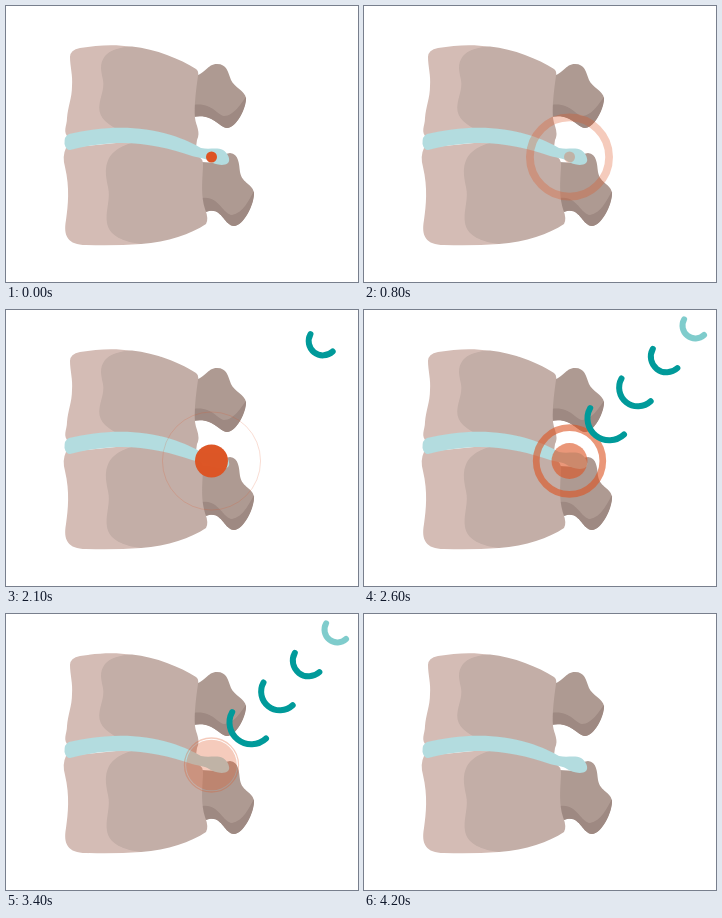
Write an HTML page that moves like this. It is 352 px wide and 276 px high and loops after 9200 ms.

```html
<!DOCTYPE html>
<html lang="en">
<head>
<meta charset="utf-8">
<title>Disc pain relief</title>
<style>
  html, body { margin: 0; width: 100%; height: 100%; overflow: hidden; background: #fff; }
  svg { display: block; width: 100vw; height: 100vh; }
  .light { fill: #d4bcb5; }
  .body { fill: #c3aea7; }
  .arch { fill: #ae9a92; }
  .shade { fill: #9e8982; }
  .disc { fill: #b3dcdf; }
  #waves { fill: none; stroke: #009a9a; stroke-width: 6; stroke-linecap: round; }
</style>
</head>
<body>
<svg viewBox="0 0 352 276">
  <!-- upper vertebra -->
  <path class="arch" d="M188 70C200 68 201 58 211 58C221 58 222 66 225 74C228 81 239 85 240 92C239 104 230 122 221 122C212 121 207 107 187 111Z"/>
  <path class="shade" d="M187 99C206 96 211 109 218 110C228 110 236 96 240 91C241 102 230 122 221 122C212 121 207 107 187 111Z"/>
  <path class="light" d="M64 51Q64 44 74 42C92 39 110 38 126 41L135 130L63 132C56 126 61 120 61 112C62 100 66 92 66 80C67 70 64 60 64 51Z"/>
  <path class="body" d="M126 40.5C150 43 174 53 190 63Q193 65 192 70C190 84 188 100 189 112C190 120 195 126 191 134L190 141L125 130C107 122 95 115 93.5 105C92 94 99 85 97 74C95 65 93 58 99 50C104 44 114 41 126 40.5Z"/>
  <!-- lower vertebra -->
  <path class="arch" d="M195 156L213 157Q217 147 224 147C233 148 233 158 234 166C236 178 248 178 248 188C247 200 237 220 228 220C218 219 216 202 203 205L196 207Z"/>
  <path class="shade" d="M196 192C212 189 217 208 226 209C237 207 243 194 248 185C249 199 237 220 228 220C218 219 216 202 203 205L196 207Z"/>
  <path class="light" d="M60 142Q56 150 59 161C64 182 62 200 60 214C57 230 62 239 80 239Q108 240 135 238L140 134Z"/>
  <path class="body" d="M128 136.5L142 134L190 149Q198 152 197 161C196 178 195 190 199 203Q203 213 200 218C185 228 162 236 135 238C118 236 103 230 101 217C99 205 105 193 102 181C100 171 98 162 103 152C107 145 116 139 128 136.5Z"/>
  <path class="disc" d="M63 128C93 121 130 118 165 129C178 133 188 138 195 142C203 144 211 141 217 144C222 147 225 154 222 157C217 161 208 158 203 155C199 152 194 152 186 150C150 138 115 131 64 144Q60 144 58.5 138Q58 130 63 128Z"/>
  <g fill="none" stroke="#dd5424">
    <circle id="ring" cx="205.5" cy="151"/>
    <circle id="spot" cx="205.5" cy="151" fill="#dd5424" stroke="none"/>
  </g>
  <g id="waves"></g>
</svg>
<script>
const LOOP = 9200, STEP = 100, BEAT = 1000, PULSES = 4, WAVES = 8;
const WAVE_START = 2000, WAVE_GAP = 200;
const $ = id => document.getElementById(id);
const clamp = v => Math.max(0, Math.min(1, v));
const hump = u => Math.sin(Math.PI * clamp(u));

const waves = Array.from({ length: WAVES }, () =>
  $("waves").appendChild(document.createElementNS("http://www.w3.org/2000/svg", "path")));

function set(el, attrs) {
  for (const k in attrs) el.setAttribute(k, attrs[k]);
}

// Pulses fade to a dim glow; the last one fades out completely
function fade(n, p) {
  if (n < 0 || n >= PULSES) return 0;
  return n === PULSES - 1 ? clamp(1 - 1.75 * p) : 1 - .7 * clamp(p / .8) ** 2;
}

function drawPulse(t) {
  const n = Math.floor(t / BEAT), p = t / BEAT - n;
  set($("spot"), {
    r: 5.5 + 20.3 * hump(clamp(p / .8) ** .82),
    opacity: fade(n, p)
  });
  // A ring outlives its own pulse by a moment
  const carry = p < .2 ? 1 : 0, q = p + carry;
  set($("ring"), {
    r: 27 + 31.5 * (q - .4),
    "stroke-width": 8 * hump((q - .36) / .76),
    opacity: fade(n - carry, q)
  });
}

function drawWave(el, k) {
  const x = 331.3 - 28.7 * k, y = 15.6 + 31 * k, r = Math.max(1, 12.8 + 2.97 * k);
  const at = deg => {
    const a = deg * Math.PI / 180;
    return `${x + r * Math.cos(a)} ${y + r * Math.sin(a)}`;
  };
  set(el, {
    d: `M${at(47)}A${r} ${r} 0 0 1 ${at(209)}`,
    opacity: Math.min(clamp(k + .5), clamp(4 - k))
  });
}

function draw(t) {
  drawPulse(t);
  waves.forEach((el, i) => drawWave(el, (t - WAVE_START) / WAVE_GAP - i));
}

const start = performance.now();
function tick() {
  const t = (performance.now() - start) % LOOP;
  draw(Math.floor(t / STEP) * STEP);
  requestAnimationFrame(tick);
}
tick();
</script>
</body>
</html>
```
